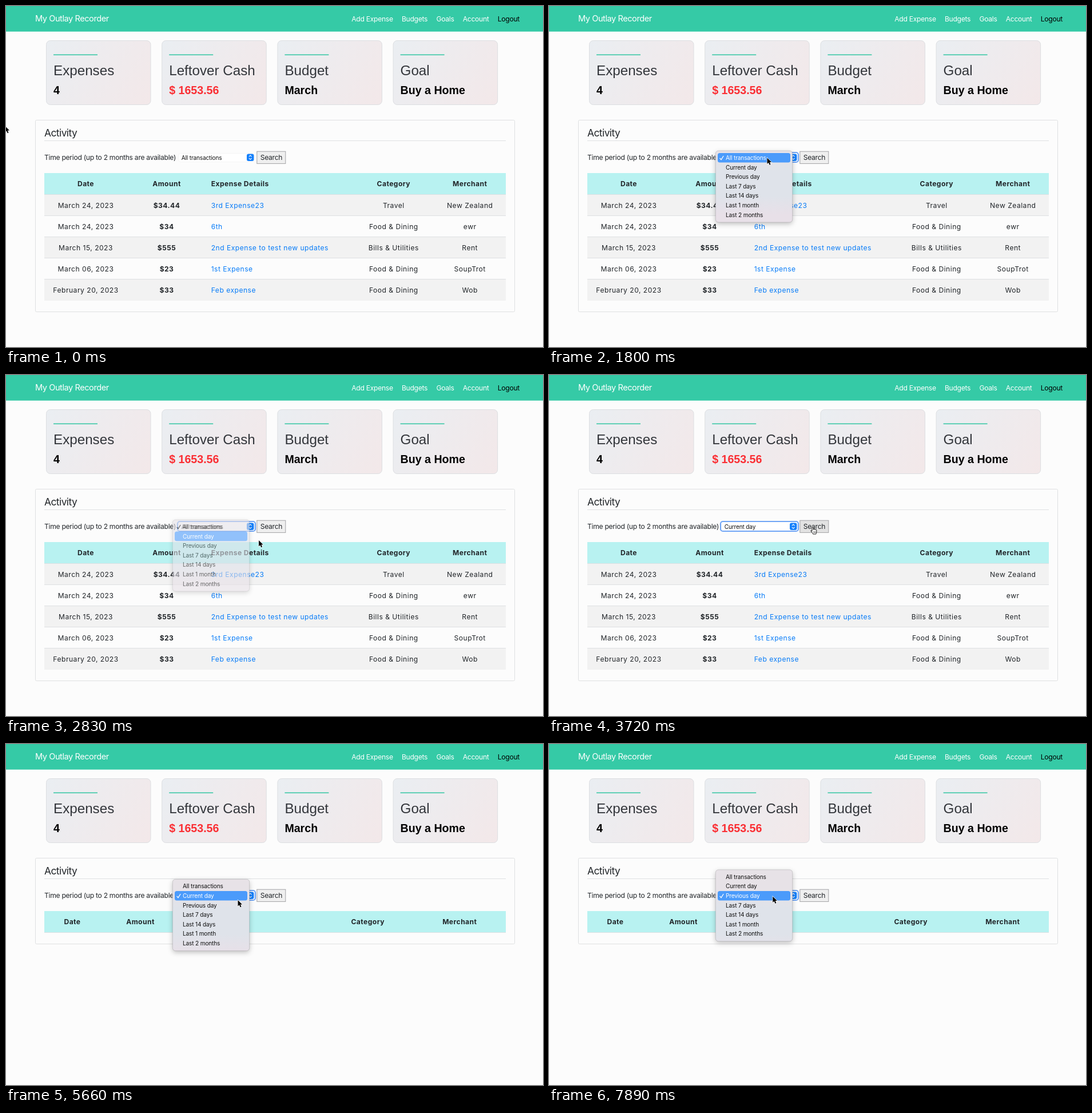
These frames come from a looping animation (939x596 px, 8000 ms). An HTML page:

```html
<!DOCTYPE html>
<html lang="en">
<head>
<meta charset="utf-8">
<title>Expense overview</title>
<style>
  html, body { margin: 0; width: 100%; height: 100%; overflow: hidden; background: #fcfcfc; }
  svg { display: block; width: 100vw; height: 100vh; }
  text { font: 12.1px Inter, sans-serif; letter-spacing: -.27px; fill: #212529; white-space: pre; }
  .brand { font-size: 14.6px; letter-spacing: -.45px; fill: #fff; }
  .nav { fill: #fff; text-anchor: end; }
  .logout { fill: #000; }
  .title { font: 24.2px "Liberation Sans", Arial, sans-serif; letter-spacing: 0; fill: #33363b; }
  .value { font: bold 19.6px "Liberation Sans", Arial, sans-serif; letter-spacing: 0; fill: #000; }
  .alert { fill: #fa3035; }
  .heading { font-size: 17.4px; letter-spacing: -.55px; }
  .cell { letter-spacing: .49px; }
  .mid { text-anchor: middle; }
  .bold { font-weight: 700; letter-spacing: .45px; }
  .link { fill: #087cf8; }
  .small { font-size: 10.1px; letter-spacing: -.16px; fill: #111; }
  .lit { fill: #fff; }
  .rule { stroke: #dee0e2; fill: none; }
  .menu { filter: drop-shadow(0 3px 4px rgba(0, 0, 0, .24)); }
</style>
</head>
<body>
<svg viewBox="0 0 939 596" preserveAspectRatio="none">
  <defs>
    <linearGradient id="cardFill" x1="0" y1="0" x2="183" y2="113" gradientUnits="userSpaceOnUse">
      <stop stop-color="#eaeef2"/><stop offset="1" stop-color="#f3e8e9"/>
    </linearGradient>
    <linearGradient id="menuFill" x1="0" y1="255" x2="0" y2="365" gradientUnits="userSpaceOnUse">
      <stop stop-color="#e7e2e7"/><stop offset=".3" stop-color="#dfe3ea"/>
      <stop offset=".7" stop-color="#dfe3ea"/><stop offset="1" stop-color="#e8e0e8"/>
    </linearGradient>
    <path id="arrow" d="M0 0V10.6L2.5 8.3L4.1 12.2L6 11.4L4.4 7.6H7.6Z"
      fill="#000" stroke="#fff" stroke-width="1.3" paint-order="stroke"/>
    <g id="hand" stroke="#000">
      <path d="M2.5 8.2V1.5a1.1 1.1 0 0 1 2.2 0V5.2a1 1 0 0 1 2 .2a1 1 0 0 1 1.9.5a.9.9 0 0 1 1.8.6V9.5C10.4 11 9.6 11.6 9.4 13H4.2C4 11.2 1.5 9.3.4 7.6C0 6.6 1.2 6.2 2.5 8.2Z"
        fill="#fff" stroke-width=".9"/>
      <path d="M5.3 8.3V11M7 8.3V11M8.6 8.3V11" stroke-width=".6"/>
    </g>
  </defs>
  <rect width="939" height="596" fill="#fcfcfc"/>
  <g id="page"></g>
  <g id="live"></g>
</svg>
<script>
const LOOP = 8000, TICK = 148.5; // the picture is refreshed once per tick
const ROW = 37, ITEM = 16.6;
const periods = ["All transactions", "Current day", "Previous day", "Last 7 days",
  "Last 14 days", "Last 1 month", "Last 2 months"];
// Column title, its place in the full table and in the empty one.
const columns = [["Date", 139.5, 116], ["Amount", 281, 235], ["Expense Details", 358.7, 314],
  ["Category", 677.8, 632.7], ["Merchant", 811.2, 793.3]];
const expenses = [
  ["March 24, 2023", "$34.44", "3rd Expense23", "Travel", "New Zealand"],
  ["March 24, 2023", "$34", "6th", "Food & Dining", "ewr"],
  ["March 15, 2023", "$555", "2nd Expense to test new updates", "Bills & Utilities", "Rent"],
  ["March 06, 2023", "$23", "1st Expense", "Food & Dining", "SoupTrot"],
  ["February 20, 2023", "$33", "Feb expense", "Food & Dining", "Wob"]
];

// Ticks at which the menu opens and closes and the button is pressed;
// every visit picks the next period.
const visits = [{ open: 9, close: 19, press: 25 }, { open: 35, close: 42, press: 46 }, { open: 53 }];

const offstage = [-20, 211], select = [381.5, 265.5], button = [461, 265];
// Eased pointer moves: first tick, last tick, destination.
const moves = [
  [0, 1, offstage], [2, 9, select], [12, 15, [385, 291]], [15, 16, [395, 280]],
  [17, 19, [442, 289]], [19, 21, button], [26, 29, [553.7, 261.5]],
  [30, 34, [405.5, 266]], [36, 38, [405.5, 273]], [38, 40, [407, 278]],
  [41, 44, button], [49, 51, [391.3, 266.5]]
];

const text = (x, y, content, style = "") =>
  `<text x="${x}" y="${y}" class="${style}">${content.replace("&", "&amp;")}</text>`;
const rect = (x, y, w, h, fill, extra = "") =>
  `<rect x="${x}" y="${y}" width="${w}" height="${h}" fill="${fill}" ${extra}/>`;
const rule = y => `<path class="rule" d="M67 ${y}H874"/>`;

function card([title, value, style = ""], i) {
  return `<g transform="translate(${70 + i * 202.2} 60)">` +
    rect(.5, .5, 182.5, 112, "url(#cardFill)", 'rx="7" stroke="#dcdee1"') +
    rect(13, 24.5, 77, 1.6, "#3bc8a6") +
    text(13, 61, title, "title") + text(13, 94, value, "value " + style) + "</g>";
}

function staticPage() {
  const links = ["Add Expense", "Budgets", "Goals", "Account"].map(label => `<tspan dx="15.2">${label}</tspan>`);
  const cards = [["Expenses", "4"], ["Leftover Cash", "$ 1653.56", "alert"],
    ["Budget", "March"], ["Goal", "Buy a Home"]];
  return rect(0, 0, 939, 44.7, "#35caa6") + text(51, 27, "My Outlay Recorder", "brand") +
    text(882.8, 26.5, links.join("") + '<tspan dx="15.2" class="logout">Logout</tspan>', "nav") +
    cards.map(card).join("") +
    text(67, 228, "Activity", "heading") + rule(235.5) +
    text(67, 269, "Time period (up to 2 months are available)");
}

function tableRow(cells, y, isHeader, filtered) {
  return cells.map((cell, i) => text(columns[i][filtered ? 2 : 1], y, cell, "cell" +
    (i === 2 ? (isHeader ? "" : " link") : " mid") +
    (isHeader || i === 1 ? " bold" : ""))).join("");
}

function table({ filtered }) {
  const head = rect(51.5, 199.5, 838, filtered ? 150 : 335, "none", 'rx="2" stroke="#dfe0e1"') +
    rect(67, 292, 807, 37.5, "#b8f2f1") +
    tableRow(columns.map(column => column[0]), 315, true, filtered) + rule(329.5);
  if (filtered) return head;
  return head + expenses.map((cells, i) => {
    const top = 330 + i * ROW;
    return rect(67, top, 807, ROW, i % 2 ? "none" : "#f2f2f2") + rule(top - .5) + tableRow(cells, top + 23);
  }).join("");
}

function controls({ chosen, focus, pressed }) {
  const box = focus
    ? rect(300, 256, 136, 17, "#fff", 'rx="4" stroke="#70a5f5" stroke-width="2.2"')
    : rect(301.5, 257.5, 132.5, 15, "#fff", 'rx="4" stroke="#f0f0f0" stroke-width=".6"');
  return box + text(306.7, 269, periods[chosen], "small") +
    rect(421, 258.5, 12.4, 12.4, "#1580fb", 'rx="3"') +
    '<path d="M424.9 263.4L427.2 261.1L429.5 263.4M424.9 266L427.2 268.3L429.5 266" fill="none" stroke="#fff" stroke-width="1.1"/>' +
    rect(438.8, 254.2, 50, 21.2, pressed ? "#e2e2e2" : "#efefef", 'stroke="#a2a2a5"') +
    text(444.7, 269, "Search");
}

// The chosen item lies over the select box; the item under the pointer is lit.
function menu({ chosen, opacity }, pointerY) {
  if (!opacity) return "";
  const first = 257 - chosen * ITEM;
  const lit = Math.floor((pointerY - first) / ITEM);
  const tick = chosen === lit ? "#fff" : "#111";
  return `<g class="menu" opacity="${opacity}">` +
    rect(291.3, first - 4, 134.4, 125, "url(#menuFill)", 'rx="5" stroke="#000" stroke-opacity=".2" stroke-width=".7"') +
    rect(295, first + lit * ITEM, 127, ITEM, "#4b9bfb", 'rx="3.5"') +
    periods.map((label, i) => text(309, first + i * ITEM + 12, label, i === lit ? "small lit" : "small")).join("") +
    `<path d="M298.7 265.8L301 268.6L305.2 262" fill="none" stroke="${tick}" stroke-width="1.3"/></g>`;
}

function pointerAt(tick) {
  let [x, y] = [-1.5, 210];
  for (const [start, end, [toX, toY]] of moves) {
    const p = Math.min(1, Math.max(0, (tick - start) / (end - start)));
    const eased = p * p * (3 - 2 * p);
    x += (toX - x) * eased;
    y += (toY - y) * eased;
  }
  return [x, y];
}

function cursor(x, y) {
  const overButton = x > 439 && x < 489 && y > 254 && y < 275;
  return `<use href="#${overButton ? "hand" : "arrow"}" x="${overButton ? x - 3.6 : x}" y="${y}"/>`;
}

function stateAt(tick) {
  const { open, close, press } = visits.findLast(visit => tick >= visit.open) || {};
  return {
    chosen: visits.filter(visit => tick > visit.close).length,
    opacity: !open || tick > close ? 0 : tick === close ? .6 : 1,
    focus: open && !(tick > press),
    pressed: tick === press,
    filtered: tick > visits[0].press
  };
}

const live = document.getElementById("live");
let shownTick = -1;

function draw(now) {
  const tick = Math.floor(now % LOOP / TICK);
  if (tick !== shownTick) {
    shownTick = tick;
    const state = stateAt(tick), [x, y] = pointerAt(tick);
    live.innerHTML = table(state) + controls(state) + menu(state, y) + cursor(x, y);
  }
  requestAnimationFrame(draw);
}

document.getElementById("page").innerHTML = staticPage();
draw(0);
</script>
</body>
</html>
```
